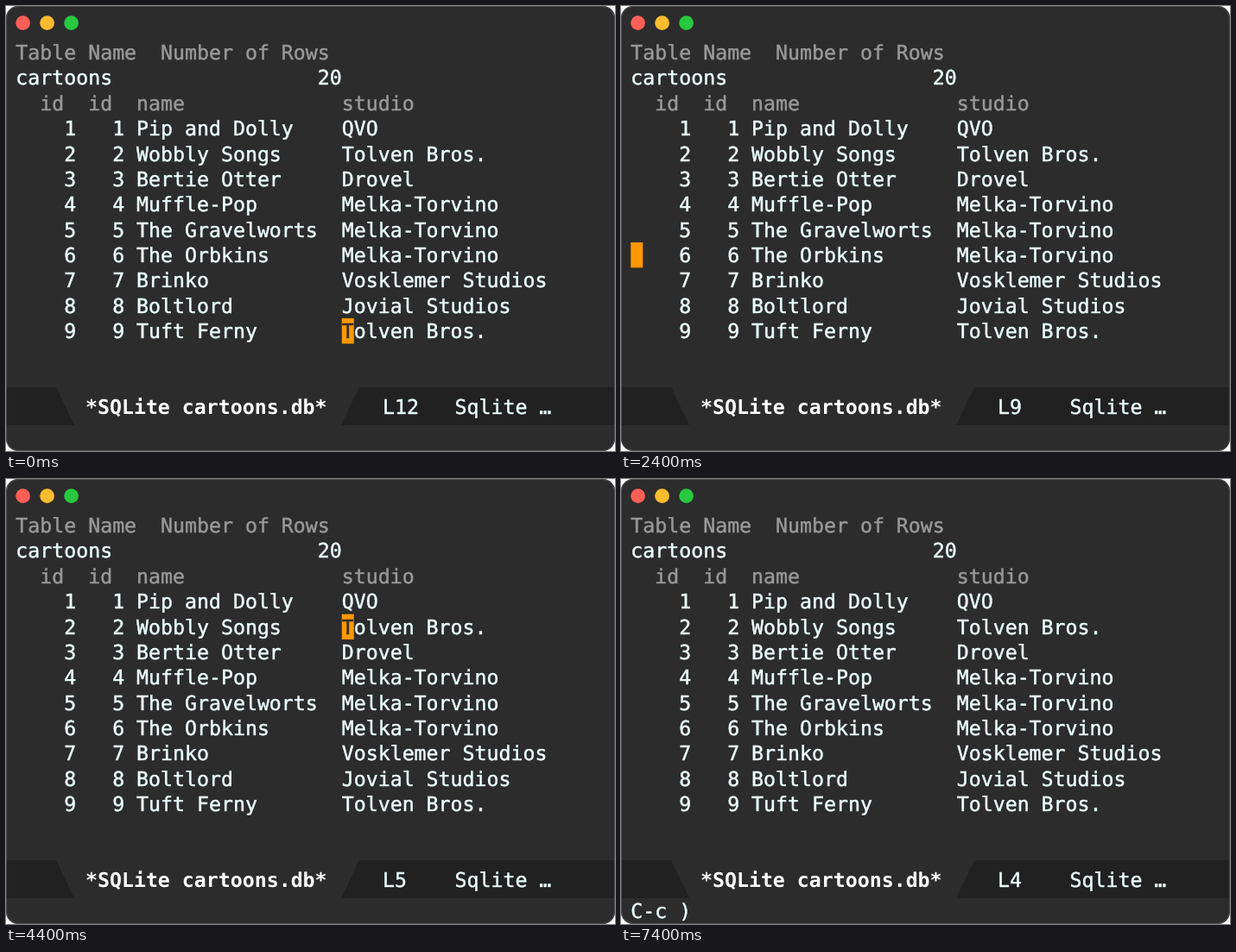
These frames come from a looping animation (705x516 px, 7500 ms). An HTML page:

```html
<!DOCTYPE html>
<html lang="en">
<head>
<meta charset="utf-8">
<title>SQLite table</title>
<style>
  html, body { margin: 0; width: 100%; height: 100%; overflow: hidden; background: #fff; }
  svg { display: block; width: 705px; height: 516px; }
  text {
    font: 23.22px "DejaVu Sans Mono", "Noto Sans Mono", monospace;
    color: #eeffff;
    fill: currentColor;
    stroke: currentColor;
    stroke-width: 0.45px;
    white-space: pre;
    text-rendering: geometricPrecision;
  }
  .head { color: #999; }
  .bold { font-weight: bold; color: #fff; stroke: none; }
  .under { color: #2c2c2c; }
</style>
</head>
<body>
<svg id="stage" viewBox="0 0 705 516">
  <rect width="705" height="516" rx="14" fill="#2c2c2c"/>
  <circle cx="19.6" cy="19.6" r="8.4" fill="#ff5f57"/>
  <circle cx="47.6" cy="19.6" r="8.4" fill="#febc2e"/>
  <circle cx="75.6" cy="19.6" r="8.4" fill="#28c840"/>
  <path d="M0 442H58L79 486H0ZM409 442H705V486H388Z" fill="#212121"/>
  <rect x="0.5" y="0.5" width="704" height="515" rx="13.5" fill="none" stroke="#505050"/>
</svg>
<script>
const LOOP = 7500;
const LEFT = 11.3, CELL = 13.98;
const TOP = 39.3, PITCH = 29.35, ASCENT = 22.8;
const STOPS = [27, 10, 6, 0];   // cell columns visited from right to left

const rows = [
  ["Pip and Dolly", "QVO"],
  ["Wobbly Songs", "Tolven Bros."],
  ["Bertie Otter", "Drovel"],
  ["Muffle-Pop", "Melka-Torvino"],
  ["The Gravelworts", "Melka-Torvino"],
  ["The Orbkins", "Melka-Torvino"],
  ["Brinko", "Vosklemer Studios"],
  ["Boltlord", "Jovial Studios"],
  ["Tuft Ferny", "Tolven Bros."]
];

const stage = document.getElementById("stage");
const colX = col => LEFT + col * CELL;
const lineY = line => TOP + line * PITCH;

function add(tag, attrs, content = "") {
  const el = document.createElementNS("http://www.w3.org/2000/svg", tag);
  for (const key in attrs) el.setAttribute(key, attrs[key]);
  el.textContent = content;
  return stage.appendChild(el);
}

const label = (x, y, content, cls = "") => add("text", { x, y, class: cls }, content);
const put = (col, line, content, cls) => label(colX(col), lineY(line) + ASCENT, content, cls);

put(0, 0, "Table Name", "head");
put(12, 0, "Number of Rows", "head");
put(0, 1, "cartoons");
put(25, 1, "20");
put(2, 2, "id", "head");
put(6, 2, "id", "head");
put(10, 2, "name", "head");
put(27, 2, "studio", "head");
rows.forEach(([name, studio], i) => {
  put(4, i + 3, i + 1);
  put(8, i + 3, i + 1);
  put(10, i + 3, name);
  put(27, i + 3, studio);
});

label(92, 472.8, "*SQLite cartoons.db*", "bold");
label(519.5, 472.8, "Sqlite …");
const lineNo = label(436, 472.8, "");
const echo = label(LEFT, 509.1, "");
const cursor = add("rect", { width: CELL, height: PITCH, fill: "#ff9800" });
const glyph = label(0, 0, "", "under");

// Key repeat moves the cursor; times fall on a 100 ms grid.
const stepTime = k => Math.round((233 + 155.1 * k) / 100) * 100;

function stepsAt(t) {
  if (t >= 5700) return 35;
  let n = 0;
  while (n < 34 && t >= stepTime(n)) n++;
  return n;
}

function render(t) {
  const steps = stepsAt(t);
  const row = 8 - Math.floor(steps / 4);
  const stop = steps % 4;
  const x = colX(STOPS[stop]), y = lineY(row + 3);
  const shown = t < 6200 || (t >= 6700 && t < 7200);

  cursor.setAttribute("x", x);
  cursor.setAttribute("y", y);
  cursor.setAttribute("visibility", shown ? "visible" : "hidden");
  glyph.setAttribute("x", x);
  glyph.setAttribute("y", y + ASCENT);
  glyph.textContent = shown && stop < 2 ? rows[row][1 - stop][0] : "";
  lineNo.textContent = "L" + (row + 4);
  echo.textContent = t < 7100 ? "" : t < 7400 ? "C-c-" : "C-c )";
}

const start = performance.now();
function tick() {
  render((performance.now() - start) % LOOP);
  requestAnimationFrame(tick);
}
tick();
</script>
</body>
</html>
```
